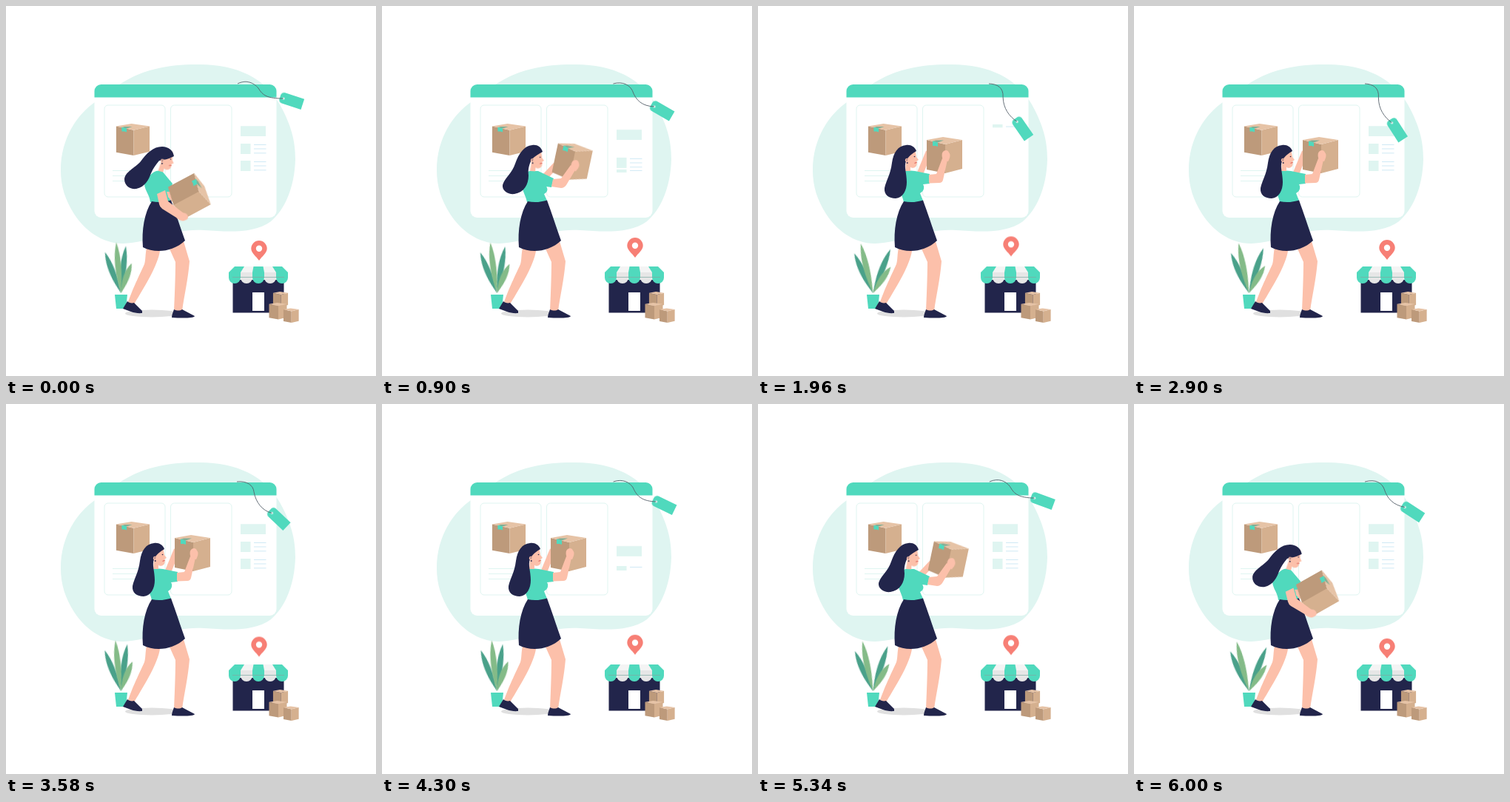
An HTML page that plays this animation: 500x500 px, repeating every 6.02 s.

```html
<!DOCTYPE html>
<html lang="en">
<head>
<meta charset="utf-8">
<title>Packing for the shop</title>
<style>
:root {
  --teal: #50d9bd; --mint: #dff5f1; --navy: #22254b; --skin: #fcc0aa;
  --loop: 6.02s;
}
html, body { margin: 0; width: 100%; height: 100%; overflow: hidden; background: #fff; }
svg { display: block; width: 100%; height: 100%; }
.teal { fill: var(--teal); }
.mint { fill: var(--mint); }
.navy { fill: var(--navy); }
.skin { fill: var(--skin); }

/* list beside the cards */
.row { animation: 3.01s linear infinite; }
.row1 { animation-name: row1; }
.row2 { animation-name: row2; }
.row3 { animation-name: row3; }
@keyframes row1 {
  0%, 26% { transform: none; }
  30% { transform: translateY(5px); }
  43% { transform: translateY(30px); }
  52% { transform: translateY(64px); }
  52.01%, 72% { transform: translateY(-16px); }
  77%, 100% { transform: none; }
}
@keyframes row2 {
  0%, 20% { transform: none; }
  30% { transform: translateY(19px); }
  43% { transform: translateY(33px); }
  46% { transform: translateY(40px); }
  46.01%, 66% { transform: translateY(-41px); }
  76%, 100% { transform: none; }
}
@keyframes row3 {
  0%, 24% { transform: none; }
  30% { transform: translateY(12px); }
  33% { transform: translateY(17px); }
  33.01%, 64% { transform: translateY(-64px); }
  65.1% { transform: translateY(-59px); }
  75%, 100% { transform: none; }
}

.pin { animation: pin 3.01s linear infinite; }
@keyframes pin {
  0%, 100% { transform: none; }
  30% { transform: translateY(-4px); }
  43% { transform: translateY(-5.2px); }
  60% { transform: translateY(-6px); }
  77% { transform: translateY(-4.8px); }
  96.5% { transform: translateY(-1px); }
}

/* swinging label: each half swing is a sine, split at its middle */
.string { fill: none; stroke: #55606a; stroke-width: .9; animation: string var(--loop) infinite; }
.tag { animation: tag var(--loop) infinite; }
@keyframes string {
  0%, 83% { d: path("M313 105C325 99 335 104 341 111C347 121 353 125 375 125"); animation-timing-function: cubic-bezier(.12, 0, .39, 0); }
  20.75%, 62.25% { d: path("M312 105C327 103 335 110 336.5 117C340 132 350 143 363 144"); animation-timing-function: cubic-bezier(.61, 1, .88, 1); }
  41.5% { d: path("M312 105C322 106 331 110 329.5 125C329 140 336 151 346.5 160"); animation-timing-function: cubic-bezier(.12, 0, .39, 0); }
  100% { d: path("M312 105C327 101 335 107 338 115C342 128 350 137 366 140"); }
}
@keyframes tag {
  0%, 83% { transform: translate(375px, 125px) rotate(18deg); animation-timing-function: cubic-bezier(.12, 0, .39, 0); }
  20.75%, 62.25% { transform: translate(363px, 144px) rotate(39deg); animation-timing-function: cubic-bezier(.61, 1, .88, 1); }
  41.5% { transform: translate(346.5px, 160px) rotate(60deg); animation-timing-function: cubic-bezier(.12, 0, .39, 0); }
  100% { transform: translate(366px, 140px) rotate(33.5deg); }
}

/* --a closed angle, --b spread angle, --s length */
.leaf {
  animation: sway var(--loop) infinite
    linear(0, .07 15%, .13 30%, .25 45%, .5 56%, .77 67%, .92 82%, 1);
}
@keyframes sway {
  0%, 66.4% { transform: translate(155.5px, 388px) rotate(var(--a)) scale(1, var(--s)); }
  33.2%, 99.7%, 100% { transform: translate(155.5px, 388px) rotate(var(--b)) scale(1, var(--s)); }
}

/* carrying, lifting and placing the box */
.move { animation: var(--loop) linear infinite; }
.box { animation-name: box; }
.head { animation-name: head; transform-origin: 206px 208px; }
.hair { animation-name: hair; }
.shirt { animation-name: shirt; }
.near { animation-name: near; }
.far { animation-name: far; fill: none; stroke: var(--skin); stroke-width: 8.5; }
.hand { animation-name: hand; }
@keyframes box {
  0%, 100% { transform: translate(247px, 257px) rotate(62deg); }
  11%, 15%, 85%, 89% { transform: translate(257px, 211px) rotate(12deg); }
  28%, 71.5% { transform: translate(252px, 202px) rotate(0deg); }
}
@keyframes head {
  0%, 100% { transform: translate(10px, 2px) rotate(14deg); }
  11%, 15%, 85%, 89% { transform: translate(2px, .5px) rotate(3deg); }
  28%, 71.5% { transform: translate(0, 0) rotate(0deg); }
}
@keyframes hair {
  0%, 100% { d: path("M227 203C226 195 219 190 211 190C199 190 190 199 182 210C174 219 161 224 160 234C160 243 168 248 176 247C188 245 193 234 196 226C199 219 203 214 207 209C212 208 220 207 227 203Z"); }
  11%, 15%, 85%, 89% { d: path("M217 197C215 190 209 187 203 188C192 189 185 199 180 213C176 226 165 233 163 242C162 250 171 255 179 254C192 252 198 241 198 229C197 220 199 214 202 208C206 203 212 200 217 197Z"); }
  28%, 71.5% { d: path("M214 196C212 190 206 187 200 188C189 189 183 198 181 212C179 228 173 236 171 246C170 255 177 260 186 260C196 259 201 249 201 238C201 226 197 217 200 210C203 203 209 199 214 196Z"); }
}
@keyframes shirt {
  0%, 100% { d: path("M203 223L210 222L225 240L221 251L217 251C218 254 219 257 219 258L223 263C213 267 204 266 195 265C194 255 188 250 187 241C191 233 195 226 203 223Z"); }
  11%, 15%, 85%, 89% { d: path("M199 223L211 223L232 233L229 245L222 244C225 248 223 252 219 254L223 263C213 267 204 266 196 265C194 255 189 250 190 242C193 232 194 226 199 223Z"); }
  28%, 71.5% { d: path("M201 222L212 223L232 227L232 240L223 241C226 246 223 251 219 253L223 263C213 267 204 266 197 265C195 255 190 250 191 243C194 232 194 225 201 222Z"); }
}
@keyframes near {
  0%, 100% { d: path("M215 249L219 264L240 280L235 289L211 274Q208 272 207 268L204 254Z"); }
  11%, 15%, 85%, 89% { d: path("M231 234L242 233L255 215L262 220L249 242Q246 246 242 246L229 244Z"); }
  28%, 71.5% { d: path("M231 228L241 227L249 206L256 208L250 235Q249 239 245 239L231 239.5Z"); }
}
@keyframes far {
  0%, 100% { d: path("M216 245L226 263"); }
  11%, 15%, 85%, 89% { d: path("M219 232L235 215"); }
  28%, 71.5% { d: path("M219 226L231 197"); }
}
@keyframes hand {
  0%, 100% { transform: translate(239px, 285px) rotate(98deg); }
  11%, 15%, 85%, 89% { transform: translate(261px, 215px) rotate(16deg); }
  28%, 71.5% { transform: translate(254px, 202px) rotate(0deg); }
}
</style>
</head>
<body>
<svg viewBox="0 0 500 500">
  <defs>
    <g id="carton">
      <path fill="#bd9a7b" d="M-24-21L1-15V24L-24 19Z"/>
      <path fill="#d5b08f" d="M1-15L24-21V18L1 24Z"/>
      <path fill="#e6c3a6" d="M-24-21L-2-25L24-21L1-15Z"/>
    </g>
    <g id="taped">
      <use href="#carton"/>
      <path fill="#7fae95" d="M-16-19L-12-20.5L-1-20.5L-9-17.5Z"/>
      <path class="teal" d="M-16-19.5L-9-17.5V-12L-12-13L-16-13Z"/>
    </g>
    <path id="blade" d="M0 0C-2-10-9-38 0-64C7-40 2-14 0 0Z"/>
    <path id="scallop" d="M0 0H16V7A8 8 0 0 1 0 7Z"/>
    <g id="entry">
      <path class="mint" d="M317 0h13.5v14H317Z"/>
      <path fill="none" stroke="#cfe9f5" d="M335 1.5h16.5M335 7h16.5M335 12.8h16.5"/>
    </g>
    <clipPath id="slot"><path d="M310 160.5h50v64h-50Z"/></clipPath>
  </defs>

  <path class="mint" d="M258 79C310 78 350 97 370 133C386 162 391 183 391 207C390 245 377 275 358 291C335 308 300 305 268 303C225 300 198 319 158 321C130 321 106 303 92 281C80 262 74 244 74 222C74 178 97 146 120 130C150 110 175 79 258 79Z"/>

  <!-- shop window -->
  <rect x="119.5" y="106" width="246" height="180" rx="9" fill="#fff"/>
  <path class="teal" d="M119.5 123.6V115A9 9 0 0 1 128.5 106H356.5A9 9 0 0 1 365.5 115V123.6Z"/>
  <g fill="none" stroke="#dff5f1">
    <rect x="133" y="134" width="82" height="124" rx="5"/>
    <rect x="222.5" y="134" width="82.5" height="124" rx="5"/>
    <path d="M144 222.5H196M144 229.5H196M144 236.5H196"/>
  </g>
  <use href="#taped" transform="translate(171.5 181) scale(.94 .88)"/>
  <g clip-path="url(#slot)">
    <path class="mint row row1" d="M317 162.3h34v13.7h-34Z"/>
    <g class="row row2"><use href="#entry" y="186"/></g>
    <g class="row row3"><use href="#entry" y="209"/></g>
  </g>
  <g class="tag">
    <path class="teal" d="M-5-4Q-4-8 0-8H27V7H0Q-4 7-5 3Z"/>
    <circle r="1.5" fill="#fff"/>
  </g>
  <path class="string"/>

  <!-- plant -->
  <g fill="#4aa18a">
    <use class="leaf" href="#blade" style="--a:-21.4deg;--b:-25.3deg;--s:.93"/>
    <use class="leaf" href="#blade" style="--a:5.8deg;--b:21.7deg;--s:1"/>
  </g>
  <g fill="#84bb88">
    <use class="leaf" href="#blade" style="--a:-5.4deg;--b:-14deg;--s:1.08"/>
    <use class="leaf" href="#blade" style="--a:19.5deg;--b:34deg;--s:.67"/>
  </g>
  <path class="teal" d="M147 390H164L162 409H149Z"/>

  <!-- store -->
  <path class="navy" d="M306.5 370H375.5V414.5H306.5Z"/>
  <path fill="#fff" d="M333 387H349V412H333Z"/>
  <path class="teal" d="M309 352H373L381 360H301Z"/>
  <path fill="#f4f4f4" d="M322 352H334.5L333 360H317ZM347.5 352H360L365 360H349Z"/>
  <g class="teal">
    <use href="#scallop" x="301" y="360"/>
    <use href="#scallop" x="333" y="360"/>
    <use href="#scallop" x="365" y="360"/>
  </g>
  <g fill="#e6e6e6">
    <use href="#scallop" x="317" y="360"/>
    <use href="#scallop" x="349" y="360"/>
  </g>
  <path stroke="#7fa9a3" stroke-width=".7" d="M306 366.5H376"/>
  <use href="#carton" transform="translate(371 396.5) scale(.42)"/>
  <use href="#carton" transform="translate(367.5 412.5) scale(.5 .46)"/>
  <use href="#carton" transform="translate(385.3 418.5) scale(.43 .4)"/>
  <g class="pin">
    <path fill="#f77f75" d="M342 344C338 338 331.3 334 331.3 327.7A10.7 10.7 0 0 1 352.7 327.7C352.7 334 346 338 342 344Z"/>
    <circle cx="342" cy="327.8" r="4.2" fill="#fff"/>
  </g>

  <!-- woman -->
  <ellipse cx="197" cy="415.5" rx="36" ry="5" fill="#e0e0e0"/>
  <path class="skin" d="M190 327L208 331C205 350 190 375 173 403L165 400C172 380 183 358 187 349C189 342 188 336 190 327ZM220 326L240 318L248 345C246 370 241 390 238 412H227C228 390 229 365 229 346Z"/>
  <path class="navy" d="M164 399C166 401 170 402 173 401L184 412V415C174 416 166 412 158 409ZM227 410C231 412 235 412 238 410L255 419C254 422 238 422 224 421C224 417 226 413 227 410Z"/>
  <path class="move far"/>
  <path class="teal move shirt"/>
  <path class="navy" d="M197 264C206 266 215 265 223 262.5C229 279 236 300 242 317C226 332 202 335 185 326C183 303 187 279 197 264Z"/>
  <g class="move head">
    <path class="skin" d="M201 196L212 193C213 199 214 202 214 204L217 208L214.5 209.5C215 213 215 217 211 218.5C208 219.5 206 218 206 217.5V223L199 223Z"/>
    <circle cx="211.5" cy="203.5" r=".8" class="navy"/>
    <path fill="none" stroke="#d9544f" d="M211.5 212.3L214.5 211.5"/>
  </g>
  <path class="navy move hair"/>
  <g class="move head">
    <circle cx="201.5" cy="208.3" r="2.6" class="skin"/>
    <path fill="none" stroke="#22254b" stroke-width=".6" d="M202.5 207C200 206.5 200.5 209 202 209.5"/>
    <circle cx="201.8" cy="212" r=".9" class="navy"/>
  </g>
  <g class="move box"><use href="#taped"/></g>
  <path class="skin move near"/>
  <g class="move hand">
    <path class="skin" d="M-4 6C-6 1-6-4-3-6C0-8 3-7 4-4C7-1 5 4 3 8Z"/>
  </g>
</svg>
</body>
</html>
```
